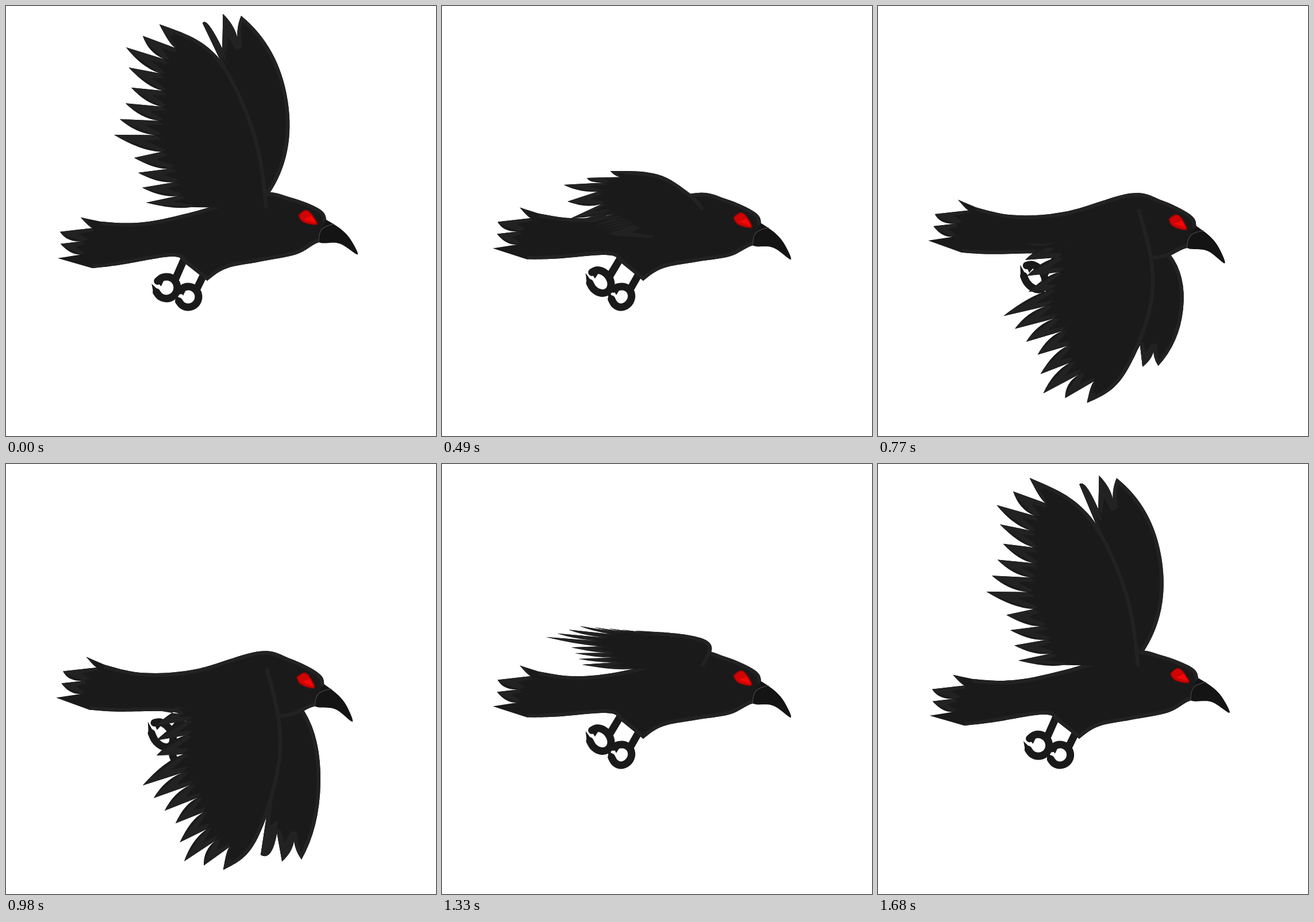
An HTML page with a canvas that plays this animation: 748 by 748 pixels, repeating every 1750 ms.

```html
<!DOCTYPE html>
<html lang="en">
<head>
<meta charset="utf-8">
<title>Flying raven</title>
<style>
html, body { margin: 0; height: 100%; overflow: hidden; background: #fff; }
canvas { display: block; width: 100vw; height: 100vh; }
</style>
</head>
<body>
<canvas id="stage" width="748" height="748"></canvas>
<script>
const g = document.getElementById('stage').getContext('2d');
const LOOP = 1750, STEP = 70;
const FILL = '#1a1a1a', EDGE = '#222';
const SHOULDER = [456, 352];

const pairs = (...n) => Array.from({ length: n.length / 2 }, (_, i) => [n[2 * i], n[2 * i + 1]]);
const mix = (a, b, k) => [a[0] + (b[0] - a[0]) * k, a[1] + (b[1] - a[1]) * k];
const shift = (p, a, b, k) => [p[0] + (b[0] - a[0]) * k, p[1] + (b[1] - a[1]) * k];
const clamp = v => Math.max(0, Math.min(1, v));

// A pose: six tips and two leading-edge points of the near wing,
// then first tip, last tip, edge and foot of the far wing.
const KEY_TIPS = [0, 2, 4, 7, 8, 11];
const hidden = pairs(400, 345, 410, 338, 440, 338, 456, 345);
const raised = [
  ...pairs(267, 32, 209, 72, 218, 142, 188, 224, 223, 264, 244, 342), ...pairs(368, 88, 432, 215),
  ...pairs(342, 30, 409, 17, 490, 165, 457, 328)];
const bent = [
  ...pairs(283, 71, 221, 75, 220, 158, 185, 234, 221, 271, 243, 343), ...pairs(380, 94, 438, 225),
  ...pairs(401, 68, 452, 70, 516, 180, 485, 330)];
const folded = [
  ...pairs(293, 287, 212, 311, 225, 369, 264, 382, 270, 386, 288, 396), ...pairs(375, 293, 430, 325),
  ...hidden];
const lowered = [
  ...pairs(350, 673, 268, 655, 263, 587, 212, 519, 262, 487, 250, 405), ...pairs(425, 622, 481, 495),
  ...pairs(420, 560, 465, 568, 515, 500, 498, 432)];
const pushed = [
  ...pairs(378, 706, 310, 691, 295, 625, 238, 559, 262, 507, 262, 428), ...pairs(438, 650, 480, 500),
  ...pairs(443, 680, 514, 688, 547, 555, 519, 430)];
const flat = [
  ...pairs(335, 290, 290, 286, 240, 282, 181, 301, 225, 319, 244, 349), ...pairs(430, 298, 468, 315),
  ...hidden];

const blend = (a, b, k) => a.map((p, i) => mix(p, b[i], k));
// The near wing swings past its raised pose while the far wing lags.
const overswing = k => raised.map((p, i) => mix(p, bent[i], (i < 8 ? -0.2 : 0.14) * k));

const track = [[0, raised], [280, bent], [490, folded], [630, lowered], [980, pushed],
  [1120, blend(lowered, pushed, 1.5)], [1330, flat], [1540, overswing(3)], [1680, overswing(1)]];

// Looping monotone cubic through the poses.
function poseAt(t) {
  const n = track.length;
  const key = i => {
    const turn = Math.floor(i / n), [time, pose] = track[i - turn * n];
    return [time + turn * LOOP, pose];
  };
  const now = track.findLastIndex(([time]) => time <= t);
  const [a, b, c, d] = [-1, 0, 1, 2].map(k => key(now + k));
  const h = c[0] - b[0], u = (t - b[0]) / h;
  const tangent = (p, q) => p * q <= 0 ? 0 : 2 * p * q / (p + q) * h;
  return b[1].map((p, j) => p.map((v, k) => {
    const s0 = (v - a[1][j][k]) / (b[0] - a[0]);
    const s1 = (c[1][j][k] - v) / h;
    const s2 = (d[1][j][k] - c[1][j][k]) / (d[0] - c[0]);
    const m0 = tangent(s0, s1), m1 = tangent(s1, s2), rise = s1 * h;
    return v + u * (m0 + u * (3 * rise - 2 * m0 - m1 + u * (m0 + m1 - 2 * rise)));
  }));
}

// Smooth curve through three or more points.
function curve(path, pts) {
  const last = pts.length - 2;
  path.lineTo(...pts[0]);
  for (let i = 0; i <= last; i++) {
    const [a, b, c, d] = [pts[i - 1], pts[i], pts[i + 1], pts[i + 2]];
    let c1 = a && shift(b, a, c, 1 / 6), c2 = d && shift(c, b, d, -1 / 6);
    c1 = c1 || mix(b, c2, 0.6);
    c2 = c2 || mix(c, c1, 0.6);
    path.bezierCurveTo(...c1, ...c2, ...c);
  }
}

// Straight upper side up to the tip, full lower side down to the next notch.
function feather(path, before, tip, after) {
  path.lineTo(...tip);
  path.quadraticCurveTo(...shift(mix(tip, after, 0.5), before, after, 0.45), ...after);
}

function polygon(pts, color) {
  g.fillStyle = color;
  g.beginPath();
  pts.forEach(p => g.lineTo(...p));
  g.fill();
}

function stroke(path, color, width) {
  g.strokeStyle = color;
  g.lineWidth = width;
  g.stroke(path);
}

// Fills a shape, then paints its edge and lighter feathers inside it.
function paint(path, edge, feathers) {
  g.fillStyle = FILL;
  g.fill(path);
  g.save();
  g.clip(path);
  stroke(edge, EDGE, 13);
  for (const [before, tip, after] of feathers) {
    const base = mix(before, after, 0.5);
    polygon([before, shift(tip, base, tip, 0.3), after, shift(base, tip, base, 0.4)], EDGE);
    polygon([mix(base, tip, 0.3), shift(after, tip, base, 0.4), shift(before, tip, base, 0.4)], FILL);
  }
  g.restore();
}

function drawFarWing(pose) {
  const [first, last, edge, foot] = pose.slice(8);
  const base = mix(pose[6], pose[7], 0.5);
  const middle = shift(mix(first, last, 0.5), foot, edge, 0.06);
  const notch = (a, b) => mix(mix(a, b, 0.5), foot, 0.17);
  const n1 = notch(first, middle), n2 = notch(middle, last);
  const path = new Path2D();
  path.moveTo(...base);
  feather(path, base, first, n1);
  feather(path, n1, middle, n2);
  path.quadraticCurveTo(...mix(mix(n2, last, 0.5), first, 0.12), ...last);
  path.quadraticCurveTo(...shift(edge, last, foot, -0.3), ...edge);
  path.quadraticCurveTo(...shift(edge, last, foot, 0.3), ...foot);
  path.lineTo(...SHOULDER);
  path.closePath();
  paint(path, path, [[base, first, n1], [n1, middle, n2]]);
}

function drawNearWing(pose) {
  const tips = Array.from({ length: 12 }, (_, i) => {
    const k = Math.max(1, KEY_TIPS.findIndex(at => at >= i));
    const from = KEY_TIPS[k - 1];
    return mix(pose[k - 1], pose[k], (i - from) / (KEY_TIPS[k] - from));
  });
  const lead = [tips[0], pose[6], pose[7], SHOULDER];
  const root = mix(pose[6], pose[7], 0.5);
  const notches = tips.map((tip, i) => i === 11 ? [tip[0] + 78, tip[1] + 8] :
    mix(mix(tip, tips[i + 1], 0.5), mix(root, SHOULDER, i / 11), 0.28));
  const feathers = tips.map((tip, i) => [notches[i - 1] || mix(tip, lead[1], 0.2), tip, notches[i]]);

  const path = new Path2D(), edge = new Path2D();
  path.moveTo(...tips[0]);
  feathers.forEach(f => feather(path, ...f));
  curve(path, [...lead].reverse());
  path.closePath();
  curve(edge, lead);
  paint(path, edge, feathers);
}

const back = pairs(130, 368, 165, 375, 240, 376, 330, 357, 440, 325, 495, 333, 545, 353, 557, 372);
const bill = pairs(557, 372, 592, 397, 612, 432);
const belly = pairs(612, 432, 580, 413, 545, 411, 505, 432, 440, 445, 385, 456, 350, 478);
const under = pairs(308, 445, 285, 436, 200, 450, 150, 456, 90, 439);
const tailTips = pairs(130, 368, 94, 393, 95, 414, 90, 439);
const eye = pairs(509, 364, 525, 356, 541, 379, 518, 376, 509, 364);
const glint = pairs(518, 371, 532, 365, 539, 377);
const seam = pairs(570, 379, 549, 389, 544, 411);
const feet = [
  { hip: [310, 440], center: [279, 490], r: 19 },
  { hip: [350, 455], center: [317, 506], r: 18 }
];

// Tail bends, head nods and feet swing with the beat.
function warper(beat) {
  const body = ([x, y]) => {
    const tail = beat * Math.pow(clamp((330 - x) / 200), 1.2);
    const nod = 0.09 * beat;
    return [
      x + tail * (10 - (y - 367) * 0.18) - (y - 330) * nod * clamp((x - 430) / 80),
      y - 33 * tail + Math.max(0, x - 430) * nod];
  };
  const foot = ([x, y]) =>
    [x - 0.15 * beat * Math.max(0, y - 440), y + 0.6 * beat * Math.min(0, x - 312)];
  return { body, foot };
}

function drawFoot({ hip, center: [x, y], r }, move) {
  const around = (a, k = 1) => move([x + k * r * Math.cos(a), y + k * r * Math.sin(a)]);
  const path = new Path2D();
  path.moveTo(...move(hip));
  path.lineTo(...around(-0.7));
  const ring = Array.from({ length: 10 }, (_, i) => around(-2.5 + i * 0.58));
  path.moveTo(...ring[0]);
  curve(path, ring);
  stroke(path, FILL, 13);
  polygon([around(3.4, 1.4), around(2.7, 1.3), around(2.6, 0.7)], FILL);
  polygon([around(-2.6, 0.9), around(-2.9, 0.5), around(-1.9, 0.7)], FILL);
}

function drawBody(t) {
  const beat = (1 - Math.cos(2 * Math.PI * (t - 35) / LOOP)) / 2;
  const { body, foot } = warper(beat);
  const bodyCurve = (pts, path = new Path2D()) => (curve(path, pts.map(body)), path);
  feet.forEach(f => drawFoot(f, foot));

  const path = new Path2D();
  [back, bill, belly, under].forEach(part => bodyCurve(part, path));
  const tips = tailTips.map(body);
  const gaps = tips.slice(1).map((tip, i) => shift(mix(tips[i], tip, 0.5), [0, 0], [38, 6], 1));
  const feathers = gaps.map((gap, i) => [gaps[i - 1] || mix(tips[0], body(back[1]), 0.3), tips[i], gap]);
  // The tail is traced from its top tip so that all feathers share one shape.
  const fan = new Path2D();
  fan.moveTo(...body(back[1]));
  feathers.forEach(f => feather(fan, ...f));
  fan.lineTo(...tips[3]);
  fan.lineTo(...body([150, 456]));
  fan.lineTo(...body([200, 420]));
  fan.closePath();

  const trunk = new Path2D();
  [back.slice(1), bill, belly, under.slice(0, -1)].forEach(part => bodyCurve(part, trunk));
  trunk.closePath();
  paint(fan, new Path2D(), feathers);
  paint(trunk, path, []);

  g.fillStyle = '#141414';
  g.fill(bodyCurve([...bill, belly[1], belly[2], seam[1], bill[0]]));
  stroke(bodyCurve(seam), '#444', 1.3);

  const lid = bodyCurve(eye);
  g.fillStyle = '#d00404';
  g.fill(lid);
  polygon(glint.map(body), '#f40808');
  stroke(lid, '#8c0606', 1.8);
}

function draw(t) {
  const pose = poseAt(t);
  g.fillStyle = '#fff';
  g.fillRect(0, 0, 748, 748);
  g.lineCap = g.lineJoin = 'round';
  drawFarWing(pose);
  drawBody(t);
  drawNearWing(pose);
}

const start = performance.now();
let shown = -1;
function tick(now) {
  const t = Math.floor(Math.max(0, now - start) % LOOP / STEP) * STEP;
  if (t !== shown) draw(shown = t);
  requestAnimationFrame(tick);
}
tick(start);
</script>
</body>
</html>
```
